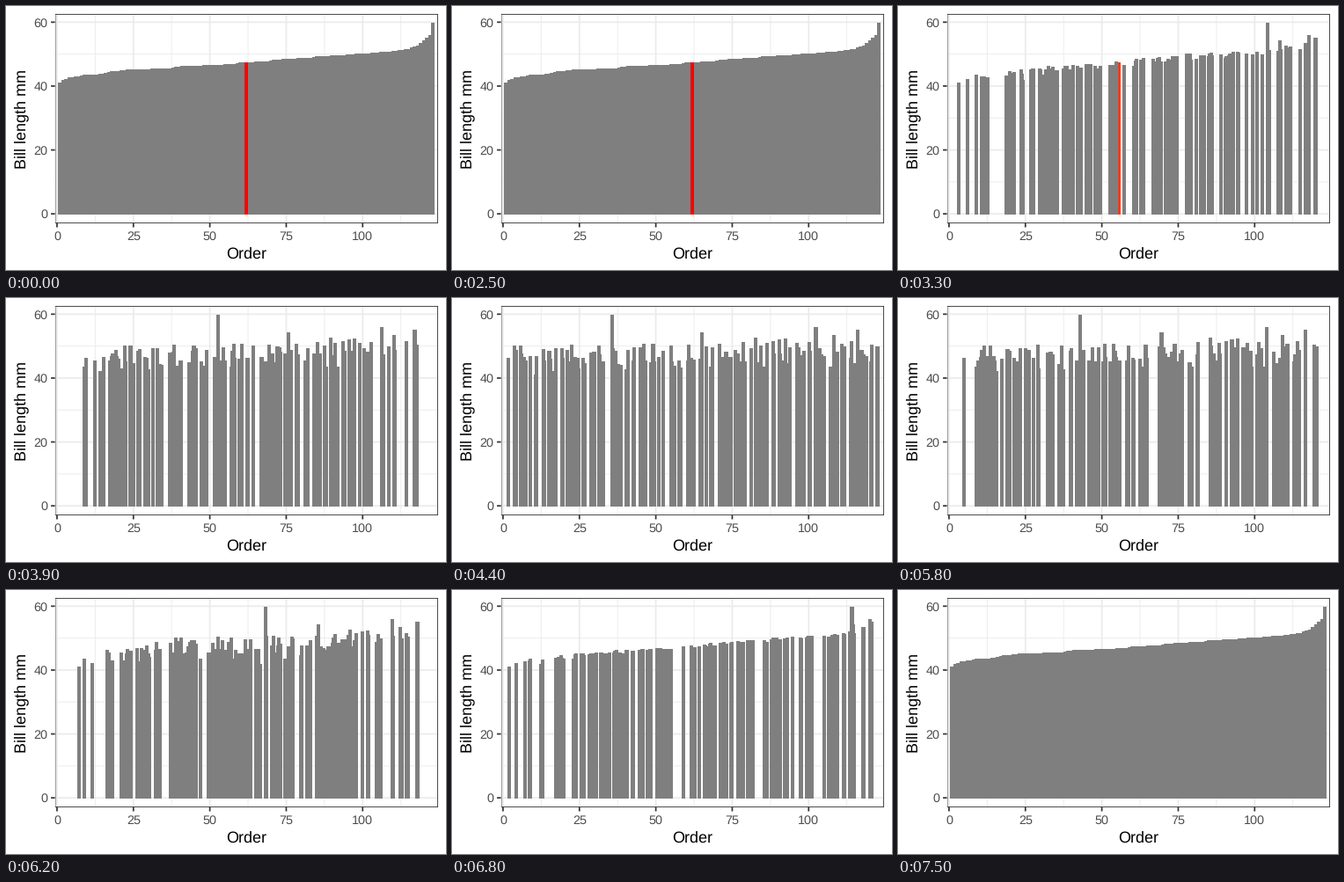
A matplotlib script that plays this animation: 500 px wide and 300 px high, repeating every 10000 ms.

```python
import numpy as np
import matplotlib.pyplot as plt
from matplotlib.animation import FuncAnimation
from matplotlib.collections import PolyCollection
from matplotlib.patches import Rectangle

plt.rcParams["font.family"] = "Liberation Sans"
plt.rcParams["text.hinting"] = "none"

W, H, DPI = 500, 300, 100
PX = 72 / DPI  # points per pixel

# Gentoo bill lengths (palmerpenguins), in recorded order
BILLS = np.array([
    46.1, 50, 48.7, 50, 47.6, 46.5, 45.4, 46.7, 43.3, 46.8,
    40.9, 49, 45.5, 48.4, 45.8, 49.3, 42, 49.2, 46.2, 48.7,
    50.2, 45.1, 46.5, 46.3, 42.9, 46.1, 44.5, 47.8, 48.2, 50,
    47.3, 42.8, 45.1, 59.6, 49.1, 48.4, 42.6, 44.4, 44, 48.7,
    42.7, 49.6, 45.3, 49.6, 50.5, 43.6, 45.5, 50.5, 44.9, 45.2,
    46.6, 48.5, 45.1, 50.1, 46.5, 45, 43.8, 45.5, 43.2, 50.4,
    45.3, 46.2, 45.7, 54.3, 45.8, 49.8, 46.2, 49.5, 43.5, 50.7,
    47.7, 46.4, 48.2, 46.5, 46.4, 48.6, 47.5, 51.1, 45.2, 45.2,
    49.1, 52.5, 47.4, 50, 44.9, 50.8, 43.4, 51.3, 47.5, 52.1,
    47.5, 52.2, 45.5, 49.5, 44.5, 50.8, 49.4, 46.9, 48.4, 51.1,
    48.5, 55.9, 47.2, 49.1, 47.3, 46.8, 41.7, 53.4, 43.3, 48.1,
    50.5, 49.8, 43.5, 51.5, 46.2, 55.1, 44.5, 48.8, 47.2, 46.8,
    50.4, 45.2, 49.9,
])
N = len(BILLS)
ORDER = np.argsort(BILLS, kind="stable")
HEIGHTS = BILLS[ORDER]
RANKS = np.arange(1, N + 1)
RECORDED = ORDER + 1
MEDIAN = N // 2

# Panel box in pixels and the data limits it spans
LEFT, RIGHT, TOP, BOTTOM = 55.6, 491, 9, 247
X_LO, X_HI = 0.55 - 1.229, N + 0.45 + 1.229
Y_LO, Y_HI = -2.98, 62.58

GRID, DARK, LABEL, BAR = "#ebebeb", "#333333", "#4d4d4d", "#7f7f7f"
LINE = 1.746

# Frames: sorted, mix, pause, sort again
MIX_START, SORT_START, MOVE = 24, 51, 24


def px(x):
    return LEFT + (x - X_LO) * (RIGHT - LEFT) / (X_HI - X_LO)


def py(y):
    return BOTTOM - (y - Y_LO) * (BOTTOM - TOP) / (Y_HI - Y_LO)


def ease(t):
    t = min(max(t, 0), 1)
    return 4 * t**3 if t < 0.5 else 1 - 4 * (1 - t)**3


def fade(t):
    """Red to mid grey, mixed in Lab space."""
    if t >= 1:
        return BAR
    fy = (53.22 + 16) / 116
    f = np.array([fy + 80.09 * (1 - t) / 500, fy, fy - 67.2 * (1 - t) / 200])
    xyz = np.where(f > 6 / 29, f**3, 3 * (6 / 29)**2 * (f - 4 / 29))
    xyz = xyz * [0.95047, 1, 1.08883]
    lin = np.array([[3.2406, -1.5372, -0.4986],
                    [-0.9689, 1.8758, 0.0415],
                    [0.0557, -0.2040, 1.0570]]) @ xyz
    lin = np.clip(lin, 0, 1)
    return tuple(np.where(lin > 0.0031308,
                          1.055 * lin**(1 / 2.4) - 0.055, 12.92 * lin))


def bar_shapes(pos):
    x0, x1 = px(pos - 0.45), px(pos + 0.45)
    y0, y1 = np.full(N, py(0)), py(HEIGHTS)
    corners = [(x0, y0), (x0, y1), (x1, y1), (x1, y0)]
    return np.stack([np.column_stack(c) for c in corners], axis=1)


fig = plt.figure(figsize=(W / DPI, H / DPI), dpi=DPI, facecolor="white")
ax = fig.add_axes([0, 0, 1, 1])
ax.set_xlim(0, W)
ax.set_ylim(H, 0)
ax.axis("off")
panel = Rectangle((LEFT, TOP), RIGHT - LEFT, BOTTOM - TOP,
                  fc="none", ec=DARK, lw=LINE * PX, zorder=4, snap=False)
ax.add_patch(panel)
panel.set_clip_path(Rectangle((LEFT, TOP), RIGHT - LEFT, BOTTOM - TOP,
                              transform=ax.transData))


def line(xs, ys, color, width, z):
    ax.plot(xs, ys, color=color, lw=width * PX, zorder=z,
            solid_capstyle="butt", snap=False)


def text(x, y, s, size, color, ha, rot=0):
    ax.text(x, y, s, fontsize=size * PX, color=color, ha=ha, va="baseline",
            rotation=rot, rotation_mode="anchor")


for v in np.arange(12.5, 120, 25):
    line([px(v)] * 2, [TOP, BOTTOM], GRID, LINE / 2, 1)
for v in (10, 30, 50):
    line([LEFT, RIGHT], [py(v)] * 2, GRID, LINE / 2, 1)
for v in range(0, 61, 20):
    line([LEFT, RIGHT], [py(v)] * 2, GRID, LINE, 2)
    line([LEFT - 4.5, LEFT], [py(v)] * 2, DARK, LINE, 5)
    text(LEFT - 8.1, py(v) + 5.15, str(v), 14.4, LABEL, "right")
for v in range(0, 101, 25):
    line([px(v)] * 2, [TOP, BOTTOM], GRID, LINE, 2)
    line([px(v)] * 2, [BOTTOM, BOTTOM + 4.5], DARK, LINE, 5)
    text(px(v), BOTTOM + 18.6, str(v), 14.4, LABEL, "center")

text((LEFT + RIGHT) / 2, 287.2, "Order", 18, "black", "center")
text(22.3, (TOP + BOTTOM) / 2, "Bill length mm", 18, "black", "center", 90)

bars = PolyCollection(bar_shapes(RANKS), facecolors=BAR, edgecolors="none",
                      linewidths=0, antialiaseds=False, zorder=3)
bars.set_snap(False)
ax.add_collection(bars, autolim=False)


def draw(i):
    mixed = ease((i - MIX_START) / MOVE)
    away = mixed - ease((i - SORT_START) / MOVE)
    bars.set_verts(bar_shapes(RANKS + (RECORDED - RANKS) * away))
    colors = [BAR] * N
    colors[MEDIAN] = fade(mixed) if mixed > 0 else "#ff0000"
    bars.set_facecolor(colors)
    return [bars]


anim = FuncAnimation(fig, draw, frames=100, interval=100, repeat=True)
plt.show()
```
